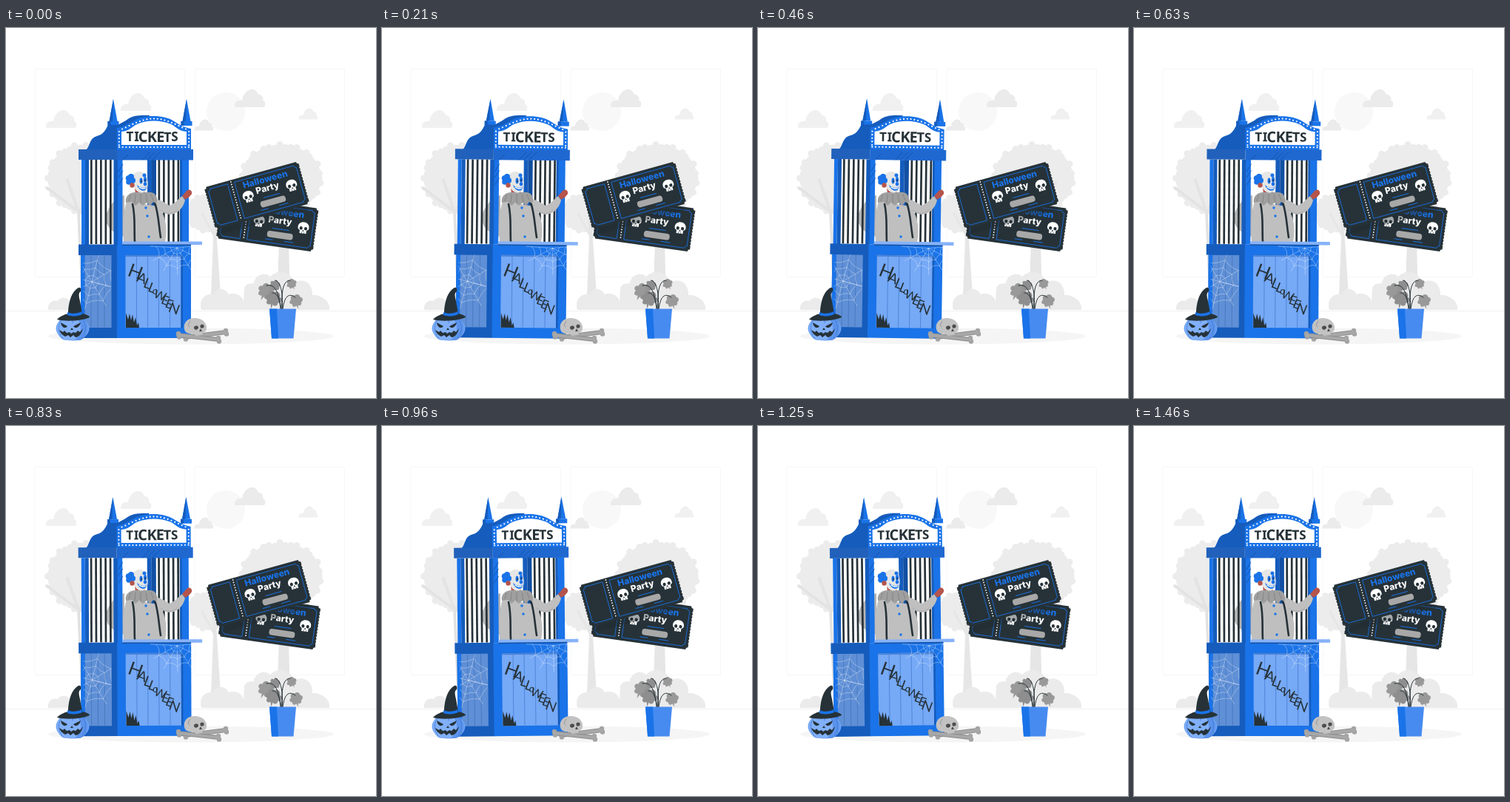
Recreate the animation shown at these times as an HTML page with a canvas. Size 500 px wide and 500 px high, loop 1500 ms.

```html
<!DOCTYPE html>
<html lang="en">
<head>
<meta charset="utf-8">
<title>Halloween tickets</title>
<style>
html, body { margin: 0; width: 100%; height: 100%; overflow: hidden; background: #fff; }
canvas { display: block; width: 500px; height: 500px; }
</style>
</head>
<body>
<canvas id="stage" width="500" height="500"></canvas>
<script>
const ctx = document.getElementById('stage').getContext('2d');
const LOOP = 1500, TAU = Math.PI * 2;
const BLUE = '#1a73e8', SIDE = '#155cbc', DEEP = '#1250a3', LIGHT = '#76a9f6', INK = '#263238';

function rect(x, y, w, h, color) {
  ctx.fillStyle = color;
  ctx.fillRect(x, y, w, h);
}
function oval(x, y, rx, ry, color, turn = 0) {
  ctx.fillStyle = color;
  ctx.beginPath();
  ctx.ellipse(x, y, rx, ry, turn, 0, TAU);
  ctx.fill();
}
function dot(x, y, r, color) { oval(x, y, r, r, color); }
function shape(d, color) {
  ctx.fillStyle = color;
  ctx.fill(new Path2D(d));
}
function line(d, color, width = 1) {
  ctx.strokeStyle = color;
  ctx.lineWidth = width;
  ctx.lineCap = ctx.lineJoin = 'round';
  ctx.stroke(new Path2D(d));
}
function text(str, x, y, font, color, turn = 0) {
  ctx.save();
  ctx.translate(x, y);
  ctx.rotate(turn);
  ctx.font = font;
  ctx.fillStyle = color;
  ctx.textAlign = 'center';
  ctx.textBaseline = 'middle';
  ctx.fillText(str, 0, 0);
  ctx.restore();
}
function group(draw, x, y, turn = 0) {
  ctx.save();
  ctx.translate(x, y);
  ctx.rotate(turn);
  draw();
  ctx.restore();
}

// Scenery
function cloud(x, y, s, color) {
  group(() => {
    ctx.scale(s, s);
    shape('M-20 12C-21 5-15 2-10 3C-9-5-3-13 5-12C9-11 11-8 12-5C18-5 19 0 18 3C22 4 22 9 20 12Z', color);
  }, x, y);
}
function foliage(x, y, rx, ry, color) {
  oval(x, y, rx - 3, ry - 3, color);
  const n = Math.round(rx * 0.75);
  for (let i = 0; i < n; i++) {
    const a = i / n * TAU, k = 0.9 + 0.05 * Math.sin(i * 2.4);
    dot(x + rx * k * Math.cos(a), y + ry * k * Math.sin(a), 4.5, color);
  }
}
function scenery() {
  for (const x of [39.5, 255.5]) {
    ctx.strokeStyle = '#f7f7f7';
    ctx.lineWidth = 1;
    ctx.strokeRect(x, 55.5, 202, 281);
  }
  dot(297, 113, 26, '#f8f8f8');
  cloud(74, 123, 1, '#f0f0f0');
  cloud(175, 100, 1, '#f0f0f0');
  cloud(329, 95, 1, '#ebebeb');
  cloud(267, 131, 0.62, '#ebebeb');
  cloud(408, 116, 0.62, '#f0f0f0');

  foliage(104, 203, 50, 48, '#ececec');
  line('M83 206L98 248L104 378M55 216L98 248M110 218L100 250', '#e3e3e3', 4);
  foliage(372, 203, 57, 48, '#ececec');
  foliage(272, 250, 28, 25, '#ececec');
  line('M376 210V365M376 240L350 212M377 235L402 210', '#e6e6e6', 5);
  shape('M369 290H382L384 370H366Z', '#e6e6e6');
  shape('M277 242H283L285 285L290 362H277L280 285Z', '#e6e6e6');
  line('M281 280L265 251M282 276L294 258', '#e6e6e6', 3);

  shape('M264 381C260 367 269 358 280 360C284 351 296 350 301 360C311 356 320 363 321 370L322 352C324 344 333 345 334 346C338 331 351 330 357 336C367 325 386 330 389 344C403 336 415 346 414 361C424 360 439 368 437 381Z', '#ebebeb');
  shape('M57 381C56 372 62 367 70 369C74 362 83 364 86 369V381Z', '#ebebeb');
  rect(0, 382, 500, 0.7, '#ebebeb');
  oval(250, 416.5, 193, 11, '#f5f5f5');
}

// Booth
function bars(x) {
  for (let i = 0; i < 5; i++) rect(x + i * 6.5, 178, 2.7, 114, INK);
}
function spire(x) {
  shape(`M${x} 96L${x + 5.5} 126H${x - 5.5}Z`, BLUE);
  shape(`M${x} 96L${x - 1} 126H${x - 5.5}Z`, SIDE);
  rect(x - 7.5, 126, 15, 6, BLUE);
  rect(x - 7.5, 126, 4, 6, SIDE);
}
function boothBack() {
  rect(102, 176, 145, 115, '#fff');
  bars(205.5);
  rect(191, 178, 6, 112, SIDE);
  rect(197, 178, 6, 112, DEEP);
  rect(235, 178, 3.5, 112, SIDE);
  rect(238, 178, 9, 112, BLUE);
}
function bulbs() {
  for (let x = 153; x <= 248; x += 4.7) dot(x, 161, 1.1, '#fff');
  for (let y = 140; y < 160; y += 4.6) { dot(152.8, y, 1.1, '#fff'); dot(247.2, y, 1.1, '#fff'); }
  for (let i = 0; i <= 18; i++) {
    const u = i / 9 - 1;
    dot(200 + u * 43, 136.5 - 14 * Math.cos(u * Math.PI / 2) ** 1.1, 1.1, '#fff');
  }
}
function sign() {
  spire(145);
  spire(244);
  shape('M108 165C114 160 112 149 123 146C131 144 134 139 138 131H151L162 125C171 117 183 118 194 118L180 165Z', SIDE);
  shape('M150 165V135C162 133 165 129 174 125C188 117 213 117 227 126C235 131 239 134 250 136V165Z', BLUE);
  shape('M156 158V140C168 139 170 133 177 130C191 124 209 124 223 130C230 133 232 139 244 140V158Z', '#fff');
  bulbs();
  const xs = [167.5, 176.5, 185, 197.5, 208.8, 218.3, 228], sizes = [17, 17, 20, 20, 20, 18, 17];
  [...'TICKETS'].forEach((c, i) =>
    text(c, xs[i], 148.5, `700 ${sizes[i]}px "Noto Sans", sans-serif`, INK));
}
function web(x, y, from, span, spokes, radius) {
  let d = '';
  const at = (i, r) => {
    const a = from + span * i / spokes;
    return [x + r * Math.cos(a), y + r * Math.sin(a)].map(v => v.toFixed(1)).join(' ');
  };
  for (let i = 0; i <= spokes; i++) d += `M${x} ${y}L${at(i, radius)}`;
  for (let r = 0.25; r < 0.95; r += 0.27) {
    d += `M${at(0, r * radius)}`;
    for (let i = 0; i < spokes; i++) d += `Q${at(i + 0.5, r * radius * 0.78)} ${at(i + 1, r * radius)}`;
  }
  line(d, 'rgba(240,245,252,.6)', 0.6);
}
function boothFront() {
  bars(114);
  rect(102, 178, 5, 115, BLUE);
  rect(107, 178, 5, 115, SIDE);
  rect(145.5, 178, 6, 115, SIDE);
  rect(151, 178, 6.5, 115, BLUE);
  line('M152 194L158 184M152 202L158 193M152 212L158 203', DEEP, 0.8);
  sign();
  rect(98, 164, 52, 14, '#2161bb');
  rect(150, 164, 103, 14.5, '#1f68d0');
  line('M185 178L194 168M191 178L201 168M198 178L208 168M158 178L165 171', DEEP, 0.8);

  // Side wall
  rect(101, 305, 50, 114, SIDE);
  rect(101, 305, 5.5, 101, BLUE);
  rect(106.5, 307, 36, 98, '#5f8fd6');
  line('M115 308V404M124 308V404M133 308V404', '#4778bd', 0.9);
  ctx.save();
  ctx.beginPath();
  ctx.rect(104, 307, 38, 98);
  ctx.clip();
  web(116, 343, 0.25, TAU, 8, 38);
  ctx.restore();
  rect(98, 292.5, 53, 14.5, SIDE);

  // Front wall
  rect(150, 293, 100, 126, BLUE);
  rect(161.5, 307, 75, 98, LIGHT);
  line('M176.5 308V404M191.5 308V404M206.5 308V404M221.5 308V404', '#4b83d6', 0.9);
  rect(161.5, 307, 75, 2, '#4b83d6');
  rect(236.5, 307, 2.5, 98, SIDE);
  shape('M162 405V385L165 394L167 386L169 395L171 387L173 398L175 391L177 402L179 398L180 405Z', INK);
  rect(157, 288.5, 108, 4.5, '#86b2f8');
  rect(157, 292.5, 93, 1.5, DEEP);
  web(231, 297, -0.1, 3.3, 6, 36);
  scrawl();
}
function scrawl() {
  const sizes = [25, 19, 19, 18, 13, 16, 17, 17, 19];
  const xs = [174.5, 183.5, 191, 197, 201.5, 208, 215, 220.5, 227];
  [...'HALLoWEEN'].forEach((c, i) =>
    text(c, xs[i], 330 + (xs[i] - 174) * 0.94, `400 ${sizes[i]}px Lato, sans-serif`, INK, 0.36));
}

// Clown
function clown() {
  shape('M160 226C148 228 135 245 135 257C135 270 146 278 160 282Z', '#b5b5b5');
  shape('M163 234C158 250 157 270 159 289H215C219 270 215 252 206 241Z', '#bfbfbf');
  shape('M202 231C212 233 217 238 221 240C230 236 233 231 238 227L242 233C239 244 232 251 222 252C212 251 207 246 202 242Z', '#bfbfbf');
  line('M209 246C215 252 226 252 232 245', '#a5a5a5', 0.8);
  shape('M238 227L245 219C249 217 252 221 251 224C248 229 245 230 242 232Z', '#b5544c');
  line('M171 238C175 254 173 272 174 289M201 236C206 250 206 264 209 283', INK, 2.6);
  for (const [x, y] of [[189, 243], [191, 254], [193, 282]]) dot(x, y, 1.7, BLUE);

  shape('M174 211H188L187 229H175Z', '#b5544c');
  shape('M162 236C160 227 168 221 177 222H195C203 222 206 231 203 237L199 235L195 240L190 236L185 240L180 236L175 240L170 235Z', '#9f9f9f');
  line('M168 226L166 234M175 225L174 236M182 225V237M189 225L191 236M196 225L199 233', '#7f7f7f', 0.8);

  shape('M172 199C174 193 186 192 189 199C193 207 193 219 186 222C177 225 170 215 172 199Z', '#e6e6e6');
  for (const [x, y, r] of [[169, 201, 4], [165.5, 203, 3.8], [166, 208, 3.8], [171, 206, 4], [187, 199, 2.5]]) dot(x, y, r, BLUE);
  dot(170.5, 212.5, 3.2, '#b5544c');
  oval(182.5, 206.5, 2, 4, BLUE);
  oval(188, 205, 2, 4, BLUE);
  dot(183, 207, 1, INK);
  dot(188.3, 206, 1, INK);
  dot(188, 211, 2.4, BLUE);
  shape('M177 212C181 216 188 217 190 214C191 222 180 222 177 212Z', BLUE);
  line('M180 215C183 217.5 187 217.5 189 216', '#fff', 1.4);
}

// Props
function pumpkin() {
  oval(90, 406, 22.5, 16.5, '#6ba0f3');
  oval(81, 406, 12, 16, '#81b0f8');
  oval(98, 406, 12, 16, '#5b93ec');
  oval(89, 406, 12, 16, '#81b0f8');
  line('M75 394C69 403 71 414 77 420M104 394C110 403 108 414 102 420M90 392V398', '#3f78d2', 0.8);
  shape('M74 398L83 403C80 407 75 405 74 398ZM101 398L91 403C94 407 99 405 101 398ZM87 408L89 405L91 408Z', INK);
  shape('M72 408L77 411L79 409L82 412L86 411L88 413L91 411L94 412L97 409L100 411L104 406C102 414 98 418 94 418L91 415L87 418L84 415L80 417C76 415 73 412 72 408Z', INK);
  shape('M69 394C72 390 79 387 84 386C84 373 88 356 98 351C101 350 102 353 101 356C97 358 99 364 100 369L103 386C109 387 113 389 113 391C103 396 80 397 69 394Z', INK);
  shape('M83 384C89 387 97 386 102 383L103 387C97 390 88 390 83 388Z', BLUE);
}
function bone(x1, y1, x2, y2) {
  line(`M${x1} ${y1}L${x2} ${y2}`, '#8e8e8e', 6);
  for (const [x, y] of [[x1, y1], [x2, y2]]) {
    dot(x, y - 2, 3.2, '#a3a3a3');
    dot(x + 1, y + 2.5, 3.2, '#a3a3a3');
  }
  line(`M${x1} ${y1}L${x2} ${y2}`, '#a8a8a8', 4);
}
function skullAndBones() {
  bone(242, 418, 297, 411);
  bone(233, 415, 287, 421);
  shape('M241 407C239 397 247 391 257 392C267 393 272 400 271 407C270 412 266 410 265 415L257 416L253 413C247 414 242 412 241 407Z', '#c2c2c2');
  oval(257, 405, 3, 2.6, '#4d4d4d', -0.3);
  oval(265, 403, 2.6, 2.6, '#4d4d4d');
  shape('M261 410L263 406L265 410Z', '#4d4d4d');
  line('M249 396L246 401L248 404', '#8c8c8c', 0.8);
}
function leaf(x, y, s, turn, color) {
  group(() => {
    ctx.scale(s, s);
    shape('M0-9C4-12 9-8 8-4C13-3 11 4 7 4C8 8 3 10 1 7L0 13L-2 7C-6 10-9 6-7 3C-12 2-11-4-7-4C-8-9-3-12 0-9Z', color);
  }, x, y, turn);
}
function plant() {
  leaf(351, 356, 1.05, 0.5, '#999');
  leaf(361, 366, 1.05, 0.2, '#8e8e8e');
  leaf(386, 346, 0.65, -0.5, '#999');
  leaf(392, 369, 0.85, -0.3, '#999');
  leaf(363, 348, 0.7, 0.8, '#8e8e8e');
  line('M371 380C369 358 364 345 352 348M373 380C372 357 374 341 384 341M374 380C376 363 382 357 391 364M372 380C370 366 366 357 360 358M373 380C375 355 370 342 364 341', INK, 1);
  shape('M356 379.5H392L388.5 419.5H359Z', '#478bf0');
  shape('M356 379.5H366L368 419.5H359Z', BLUE);
}

// Tickets
const TICKET = new Path2D('M-63-29.5H63A3 3 0 0 0 66-26.5V26.5A3 3 0 0 0 63 29.5H-63A3 3 0 0 0-66 26.5V-26.5A3 3 0 0 0-63-29.5Z');
function smallSkull(x, y) {
  group(() => {
    shape('M-7.5-1C-8-11 8-11 7.5-1C7.5 2 5 2 4.5 3V7H-4.5V3C-5 2-7.5 2-7.5-1Z', '#fff');
    oval(-3.2, 0, 2.1, 2.3, INK);
    oval(3.2, 0, 2.1, 2.3, INK);
    shape('M0 1.8L1.3 4H-1.3Z', INK);
    line('M-1.7 5.2V7M1.7 5.2V7', INK, 0.6);
  }, x, y);
}
function ticket() {
  ctx.fillStyle = INK;
  ctx.fill(TICKET);
  for (let y = -21; y <= 21; y += 4.2) { dot(-66, y, 0.8, '#fff'); dot(66, y, 0.8, '#fff'); }
  line('M-58-25.5H-34V25.5H-58A4 4 0 0 0-61.5 22.5V-22.5A4 4 0 0 0-58-25.5ZM-24-25.5H58A4 4 0 0 0 61.5-22.5V22.5A4 4 0 0 0 58 25.5H-24Z', BLUE, 0.8);
  for (let y = -27; y <= 27; y += 3.6) dot(-29, y, 0.9, '#fff');
  text('Halloween', 16.5, -17.5, '800 12px Inter, sans-serif', BLUE);
  text('Party', 16.5, -5.5, '800 12px Inter, sans-serif', '#fff');
  smallSkull(-11.5, -1);
  smallSkull(49, 0);
  ctx.fillStyle = '#a8a8a8';
  ctx.beginPath();
  ctx.roundRect(1.5, 9.5, 35, 8.5, 3.5);
  ctx.fill();
  line('M8 5.5H30M0 21H10M26 21H38', BLUE, 0.9);
}
function shadow() {
  ctx.fillStyle = 'rgba(30,40,46,.4)';
  ctx.fill(TICKET);
}
function tickets() {
  group(() => {
    ticket();
    ctx.clip(TICKET);
    group(shadow, -18, -27, -0.41);
  }, 353.3, 264, 0.139);
  group(ticket, 339, 226.3, -0.27);
}

// Motion
const bez = (a, b, s) => 3 * a * s * (1 - s) ** 2 + 3 * b * s * s * (1 - s) + s ** 3;
function ease(p) {
  let lo = 0, hi = 1;
  for (let i = 0; i < 20; i++) {
    const mid = (lo + hi) / 2;
    if (bez(0.25, 0.25, mid) < p) lo = mid; else hi = mid;
  }
  return bez(0.1, 1, lo);
}
function shakeAt(p) {
  const stops = [0, -1, 2, -4, 4, -4, 4, -4, 2, -1, 0];
  const i = Math.floor(p * 10);
  return stops[i] + (stops[i + 1] - stops[i]) * ease(p * 10 - i);
}
function swayAt(p) {
  const q = (p + 0.25) % 1;
  return (1 - Math.abs(q * 4 - 2)) * Math.PI / 180;
}
function swaying(draw, angle) {
  group(() => {
    ctx.translate(-181.5, -257.5);
    draw();
  }, 181.5, 257.5, angle);
}

function frame(now) {
  const p = now % LOOP / LOOP, sway = swayAt(p);
  rect(0, 0, 500, 500, '#fff');
  scenery();
  swaying(boothBack, sway);
  clown();
  swaying(boothFront, sway);
  pumpkin();
  skullAndBones();
  plant();
  group(tickets, shakeAt(p), 0);
  requestAnimationFrame(frame);
}
requestAnimationFrame(frame);
</script>
</body>
</html>
```
